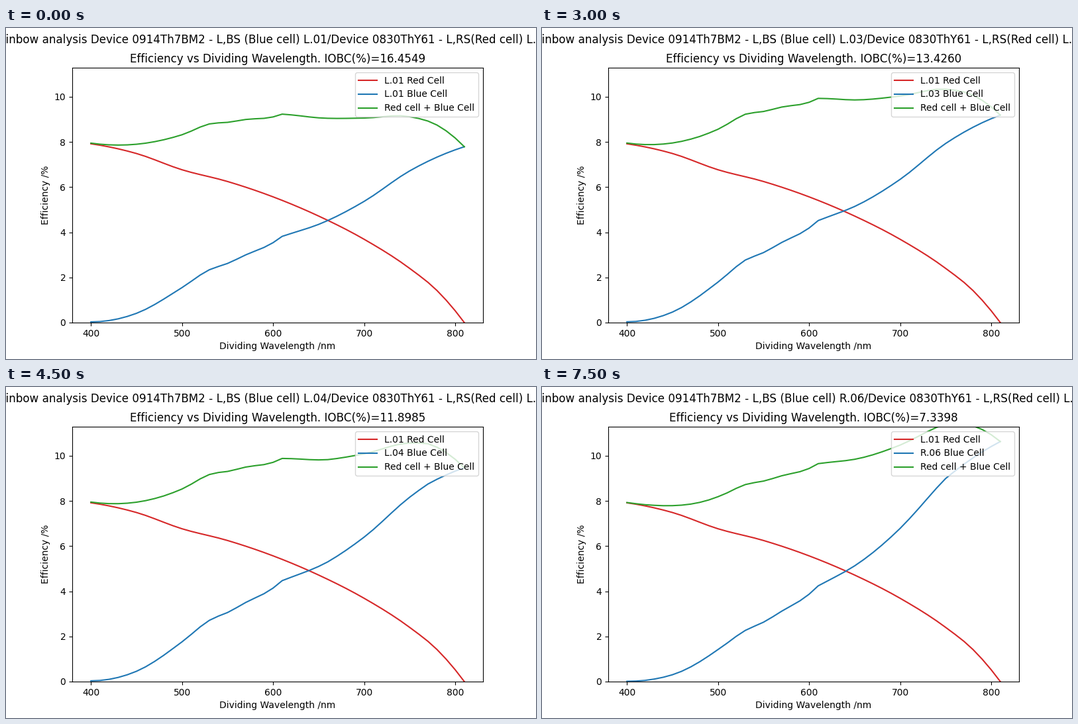
A matplotlib script that plays this animation: 800 by 500 pixels, repeating every 9000 ms.

```python
import numpy as np
import matplotlib.pyplot as plt
from matplotlib.animation import FuncAnimation

plt.rcParams["font.family"] = "DejaVu Sans"

WAVE = np.arange(400, 811, 10)


def smooth(*points):
    """Cubic Hermite curve through a few (wavelength, value) points."""
    x, y = np.array(points, float).T
    slope = np.gradient(y, x, edge_order=2)
    i = np.clip(np.searchsorted(x, WAVE, "right") - 1, 0, len(x) - 2)
    h = x[i + 1] - x[i]
    t = (WAVE - x[i]) / h
    rise = t * t * (3 - 2 * t)
    bend = h * t * (1 - t) * ((1 - t) * slope[i] - t * slope[i + 1])
    return y[i] + (y[i + 1] - y[i]) * rise + bend


def linear(*points):
    """Straight segments between (wavelength, value) points."""
    return np.interp(WAVE, *zip(*points))


red = smooth((400, 7.92), (450, 7.49), (500, 6.77), (550, 6.25), (600, 5.57),
             (650, 4.72), (700, 3.69), (750, 2.40), (780, 1.42), (810, 0))
base = smooth((400, 0.03), (450, 0.41), (500, 1.55), (530, 2.34), (550, 2.62),
              (570, 3.00), (600, 3.54), (610, 3.82), (620, 3.95), (650, 4.35),
              (700, 5.37), (750, 6.72), (810, 7.79))

# The other cells follow the base curve with a gain that drifts or jumps.
jumpy = linear((400, 0), (430, 0.82), (450, 0.98), (460, 0.64), (470, 0.725),
               (480, 1.09), (520, 1.143), (530, 1.02), (600, 1.096),
               (680, 1.133), (690, 1.2), (730, 1.192), (740, 1.151),
               (780, 1.158), (790, 1.196), (810, 1.2))
steady = linear((400, 1.13), (480, 1.14), (530, 1.184), (810, 1.18))
rising = linear((400, 1.1), (480, 1.12), (540, 1.167), (660, 1.173),
                (770, 1.225), (810, 1.216))
steep = linear((400, 0.4), (430, 0.67), (500, 0.916), (600, 1.093),
               (710, 1.281), (750, 1.339), (810, 1.365))
faint = linear((400, 0), (460, 0), (600, 0.05), (810, 0.16))

CELLS = [
    ("L.01", "16.4549", base),
    ("L.02", "11.4268", base * jumpy),
    ("L.03", "13.4260", base * steady),
    ("L.04", "11.8985", base * rising),
    ("R.05", "0.0006", faint),
    ("R.06", "7.3398", base * steep),
]

fig = plt.figure(figsize=(8, 5), dpi=100)
ax = fig.add_axes([0.125, 0.11, 0.775, 0.77])
heading = fig.suptitle("", y=0.982, fontsize=12.1)
title = ax.set_title("", fontsize=12.1)

ax.plot(WAVE, red, color="tab:red", label="L.01 Red Cell")
blue_line, = ax.plot(WAVE, base, color="tab:blue", label="L.01 Blue Cell")
sum_line, = ax.plot(WAVE, red + base, color="tab:green",
                    label="Red cell + Blue Cell")
ax.set_xlim(379.5, 830.5)
ax.set_ylim(0, 11.29)
ax.set_xlabel("Dividing Wavelength /nm")
ax.set_ylabel("Efficiency /%")
blue_label = ax.legend(loc="upper right").get_texts()[1]


def update(i):
    cell, iobc, blue = CELLS[i]
    heading.set_text(
        f"Rainbow analysis Device 0914Th7BM2 - L,BS (Blue cell) {cell}"
        "/Device 0830ThY61 - L,RS(Red cell) L.01")
    title.set_text(f"Efficiency vs Dividing Wavelength. IOBC(%)={iobc}")
    blue_line.set_ydata(blue)
    sum_line.set_ydata(red + blue)
    blue_label.set_text(f"{cell} Blue Cell")
    return heading, title, blue_line, sum_line, blue_label


anim = FuncAnimation(fig, update, frames=len(CELLS), interval=1500,
                     init_func=lambda: update(0), repeat=True, repeat_delay=0)
plt.show()
```
